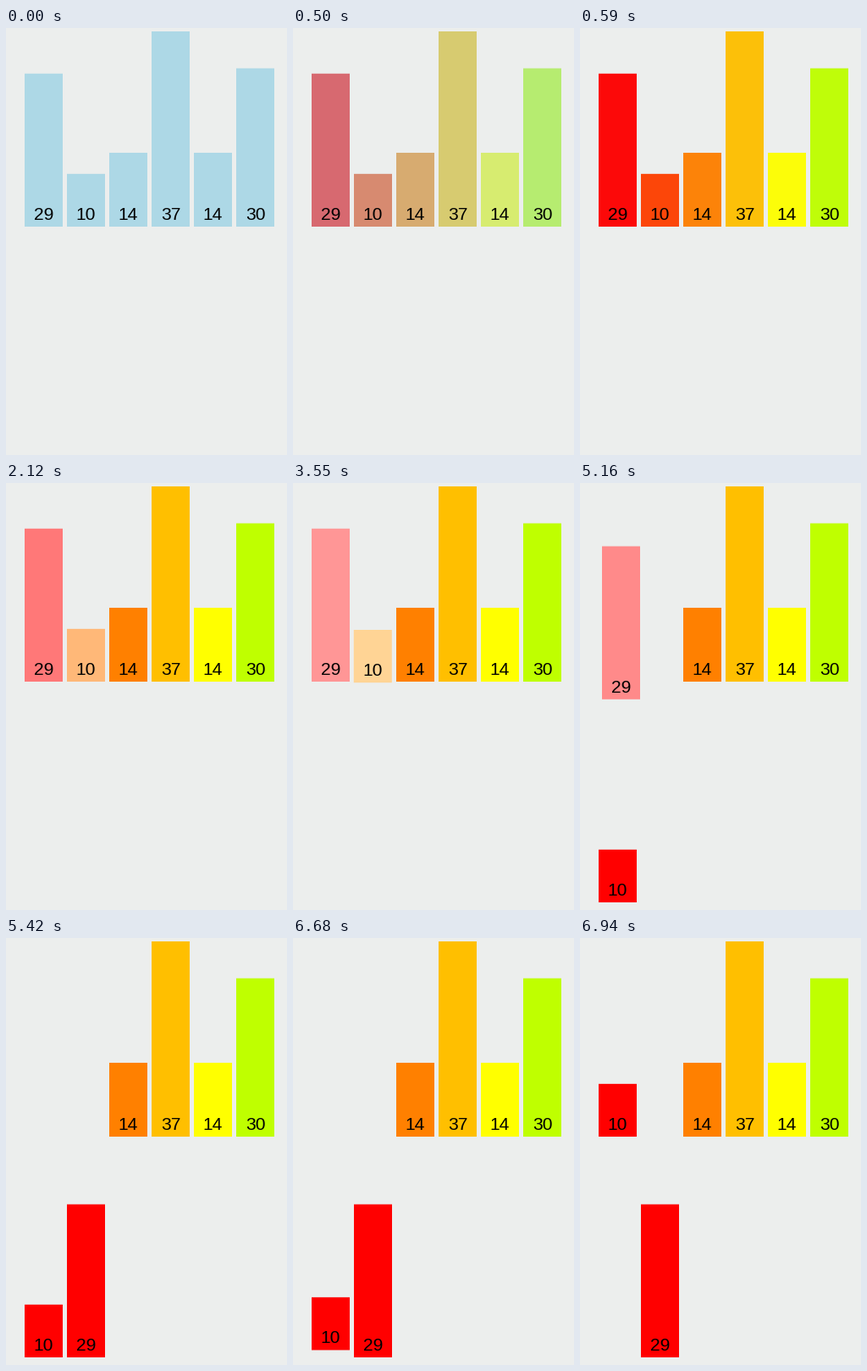
Recreate the animation shown at these times as a matplotlib script. Size 332x503 px, loop 8000 ms.

```python
import colorsys

import matplotlib.pyplot as plt
import numpy as np
from matplotlib.animation import FuncAnimation
from matplotlib.patches import Rectangle

W, H, DPI = 332, 503, 64
LOOP, STEP = 8000, 20

VALUES = [29, 10, 14, 37, 14, 30]
BAR_W, PITCH, LEFT = 45, 50, 22
TOP_BASE, ROW_GAP = 234, 260
SCALE = 230 / 37

BACKGROUND = "#eceeed"
BLUE = np.array([173, 216, 230]) / 255
RED = np.array([1.0, 0, 0])
RAINBOW = [np.array(colorsys.hsv_to_rgb(i * 15 / 360, 1, 1)) for i in range(6)]
PALE = [np.array([255, 150, 150]) / 255, np.array([255, 213, 150]) / 255]

# Standard "ease" curve: cubic Bezier (.25, .1) (.25, 1)
s = np.linspace(0, 1, 400)
EASE_X = 0.75 * s * (1 - s) ** 2 + 0.75 * s**2 * (1 - s) + s**3
EASE_Y = 0.3 * s * (1 - s) ** 2 + 3 * s**2 * (1 - s) + s**3


def ease(x):
    return float(np.interp(x, EASE_X, EASE_Y))


def held(t, start, ticks, phase, duration):
    """Eased progress that only updates at the given ticks after start."""
    passed = [k for k in ticks if t >= start + k]
    if not passed:
        return 0.0
    return ease(phase + passed[-1] / duration)


def move(t, start, phase):
    return held(t, start, (0, 90, 180, 260), phase, 220)


def mix(a, b, k):
    return a + (b - a) * k


def state(t):
    """Position (column, row) and colour of every bar at time t."""
    tint = 1.0 if t >= 2120 else held(t, 500, (0, 90), 0.3, 200)
    fade = held(t, 2120, (0, 90), 0.5, 180)
    ten_down = move(t, 3550, 0.01)
    big_down = move(t, 5160, 0.09)
    ten_up = move(t, 6680, 0.05)

    columns = np.arange(6.0)
    rows = np.zeros(6)
    columns[0], rows[0] = big_down, big_down
    columns[1], rows[1] = 1 - ten_down, ten_down - ten_up

    colors = [mix(BLUE, c, tint) for c in RAINBOW]
    for i, done in enumerate((big_down, ten_down)):
        colors[i] = mix(mix(colors[i], PALE[i], fade), RED, done)
    return columns, rows, colors


fig = plt.figure(figsize=(W / DPI, H / DPI), dpi=DPI, facecolor=BACKGROUND)
ax = fig.add_axes([0, 0, 1, 1])
ax.set(xlim=(0, W), ylim=(H, 0))
ax.axis("off")

bars, labels = [], []
for value in VALUES:
    bar = Rectangle((0, 0), BAR_W, value * SCALE, lw=0, snap=False)
    bars.append(ax.add_patch(bar))
    labels.append(ax.text(0, 0, str(value), ha="center", va="baseline",
                          family="Liberation Sans", size=21 * 72 / DPI,
                          color="black"))


def update(frame):
    columns, rows, colors = state((frame + 0.5) * STEP)
    for bar, label, col, row, color in zip(bars, labels, columns, rows, colors):
        x = LEFT + PITCH * col
        base = TOP_BASE + ROW_GAP * row
        bar.set_xy((x, base - bar.get_height()))
        bar.set_facecolor(np.clip(color, 0, 1))
        label.set_position((x + BAR_W / 2, base - 8))
    return bars + labels


anim = FuncAnimation(fig, update, frames=LOOP // STEP, interval=STEP,
                     repeat=True, repeat_delay=0)
plt.show()
```
